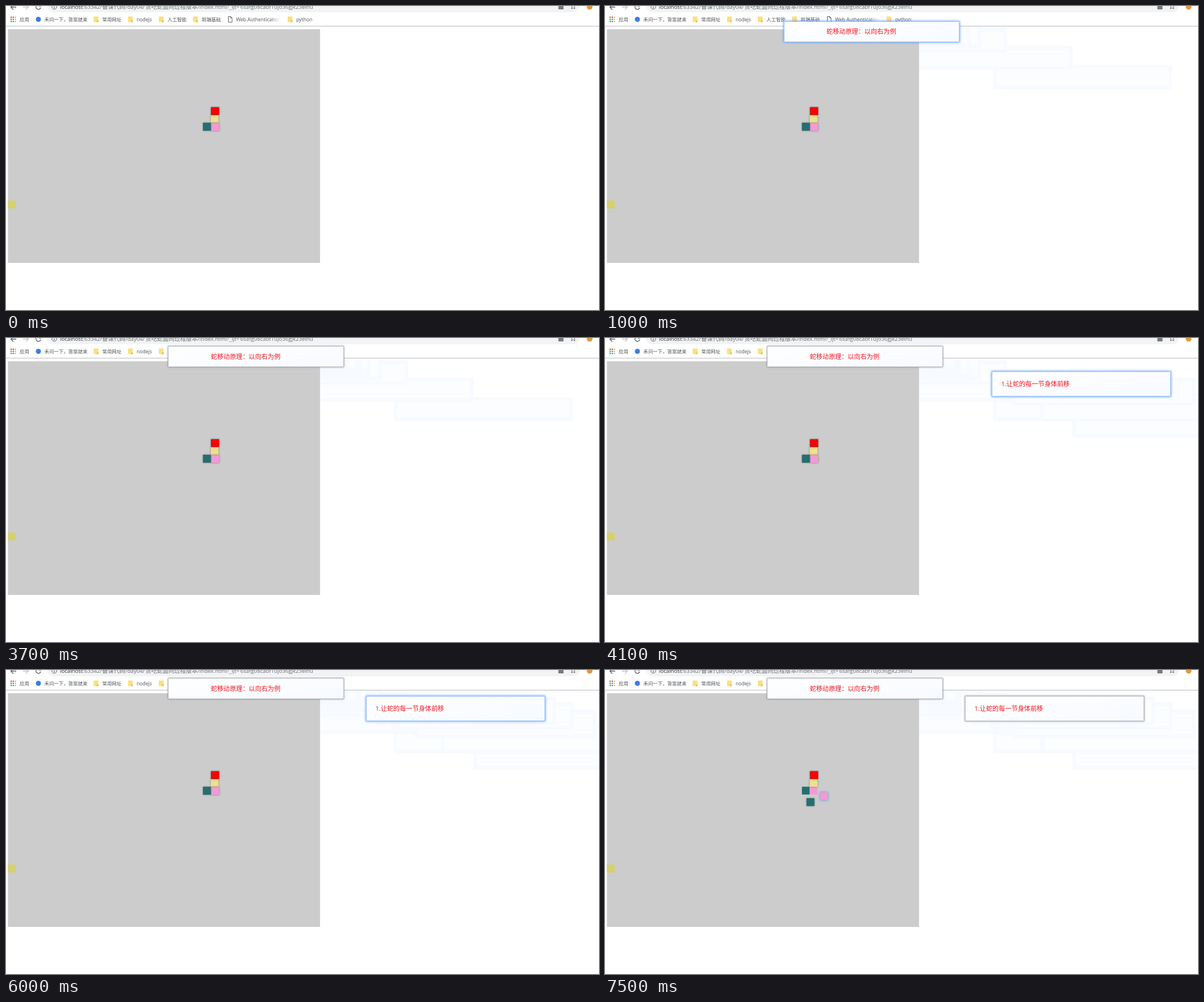
These frames come from a looping animation (1044x536 px, 8000 ms). An HTML page:

```html
<!DOCTYPE html>
<html lang="zh">
<head>
<meta charset="utf-8">
<title>蛇移动原理</title>
<style>
  html, body { margin: 0; width: 100%; height: 100%; overflow: hidden; background: #fff; }
  svg { display: block; width: 100%; height: 100%; }
  text { font-family: "Open Sans", "Noto Sans CJK SC", "Noto Sans CJK", sans-serif; white-space: pre; }
  .cjk { font-size: 8.45px; fill: #505357; }
  .latin { font-size: 8.6px; fill: #505357; }
  .note { font-size: 11.15px; fill: #f5141c; }
  .soft { filter: drop-shadow(0 0 1.5px #777); }
  .glow { filter: drop-shadow(0 0 2px #4794f5); }
  .panel { stroke: #c2c4c8; }
  .glow .panel { stroke: #8ebcf5; }
  .icon { fill: none; stroke: #5f6368; stroke-width: 1.3; }
</style>
</head>
<body>
<svg viewBox="0 0 1044 536" preserveAspectRatio="none">
  <defs>
    <linearGradient id="paper" x1="0" y1="0" x2="1" y2="1">
      <stop offset="0" stop-color="#fff"/><stop offset="1" stop-color="#f7faff"/>
    </linearGradient>
    <linearGradient id="fade">
      <stop offset="0" stop-color="#fff" stop-opacity="0"/><stop offset=".75" stop-color="#fff"/>
    </linearGradient>
    <clipPath id="blank"><rect x="553" y="36.5" width="491" height="300"/></clipPath>
  </defs>
  <rect width="1044" height="536" fill="#fff"/>

  <!-- address bar -->
  <rect x="72" y="-11" width="938" height="22" rx="11" fill="#f1f3f4"/>
  <g class="icon">
    <path d="M13-2L8.500 2L13 6.500M9 2H18"/>
    <path d="M35-2L39.500 2L35 6.500M39 2H30" stroke="#c3c5c8"/>
    <path d="M60.500-1A4.300 4.300 0 1 0 61.200 2.800M61.500-3V0H58"/>
    <circle cx="85" cy="1.500" r="4.200" stroke-width="1"/>
    <path d="M85 .8V4" stroke-width="1.200"/>
    <path d="M994.500-1.500L997-2L998.500-5L1000-2L1003-1.500L1000.700.7L1001.400 5L998.500 3.300L995.600 5L996.300.7Z" stroke-width="1"/>
  </g>
  <rect x="972.500" y="-3" width="9" height="9" fill="#777b80"/>
  <circle cx="1027.500" cy="1.500" r="5" fill="#e09a3e"/>
  <g id="url"></g>

  <!-- bookmarks -->
  <g id="apps"></g>
  <circle cx="57" cy="23.500" r="4.500" fill="#3c7be8"/>
  <g id="marks"></g>
  <path d="M391.500 18.500H395.500L398 21V28.500H391.500ZM395.500 18.500V21H398" fill="#fff" stroke="#5f6368" stroke-width="1"/>
  <rect x="466" y="16" width="24" height="16" fill="url(#fade)"/>
  <rect y="35" width="1044" height="1" fill="#b9bbbd"/>

  <!-- game board -->
  <rect x="3.400" y="41" width="549.500" height="412" fill="#ccc"/>
  <g id="trail" clip-path="url(#blank)"></g>
  <g id="cells"></g>

  <g id="title">
    <rect class="panel" x=".25" y=".25" width="308.500" height="36" fill="url(#paper)"/>
    <text class="note" x="75" y="22.300">蛇移动原理：以向右为例</text>
  </g>
  <g id="step">
    <rect class="panel" x=".25" y=".25" width="314.500" height="43.500" fill="url(#paper)"/>
    <text class="note" x="16.500" y="25.800">1.让蛇的每一节身体前移</text>
  </g>
</svg>
<script>
const LOOP = 8000, TICK = 100, CELL = 13.73;
const $ = id => document.getElementById(id);

function add(parent, tag, attrs, text) {
  const el = document.createElementNS("http://www.w3.org/2000/svg", tag);
  for (const key in attrs) el.setAttribute(key, attrs[key]);
  if (text) el.textContent = text;
  parent.appendChild(el);
  return el;
}

// address: text, x, size, colour
[
  ["localhost", 95, 9.65, "#33363a"],
  [":63342/", 135.5, 9.65],
  ["备课代码", 169.3, 10.2],
  ["/day04/", 210.2, 9.65],
  ["贪吃蛇面向过程版本", 245.5, 10.2],
  ["/index.html?", 337.3, 9.65],
  ["_ijt=", 393, 9.65],
  ["6safg08cabf1ujo36gjk23eihu", 412.5, 9.65]
].forEach(([s, x, size, fill = "#6b6f74"]) =>
  add($("url"), "text", { x, y: 5, "font-size": size, fill }, s));

const dots = ["#e2463b", "#e2463b", "#f0b429", "#35a853", "#4384f3", "#f0b429", "#35a853", "#4384f3", "#f0b429"];
dots.forEach((fill, i) => add($("apps"), "rect",
  { x: 8 + i % 3 * 3.7, y: 18.7 + Math.floor(i / 3) * 3.7, width: 2.3, height: 2.3, fill }));

// bookmark: text, x, has folder
[
  ["应用", 24], ["禾问一下，答案就来", 67.5], ["常用网址", 169.5, 1], ["nodejs", 230, 1],
  ["人工智能", 284.3, 1], ["前端基础", 344.5, 1], ["Web Authentication", 405], ["python", 511, 1]
].forEach(([s, x, folder]) => {
  const latin = /^[a-z]/i.test(s);
  add($("marks"), "text", { x, y: 27, class: latin ? "latin" : "cjk" }, s);
  if (!folder) return;
  const left = x - 15.2;
  add($("marks"), "rect", { x: left, y: 18.5, width: 8.5, height: 10, rx: .8, fill: "#fbdf83" });
  add($("marks"), "path", { d: `M${left + 5.5} 28.5V25.5H${left + 8.5}V28.5Z`, fill: "#edbf48" });
});

// board cells
function cell(x, y, fill, cls = "") {
  return add($("cells"), "rect", { x, y, width: 13.8, height: 13.8, fill, class: cls });
}
const gridX = n => 3.4 + n * CELL, gridY = n => 41 + n * CELL;
const TEAL = "#246f70", PINK = "#f29ad4";
cell(gridX(0), gridY(22), "#d5d26b");
cell(gridX(25), gridY(12), TEAL);
cell(gridX(26), gridY(12), PINK);
cell(gridX(26), gridY(11), "#eee08e", "soft");
cell(360.8, 178.4, "#c01010", "soft").setAttribute("width", 14.5);
add($("cells"), "rect", { x: 362, y: 179, width: 12.8, height: 11.5, fill: "#f00" });
const tail = cell(0, 0, TEAL), body = cell(0, 0, PINK);

// each run holds one position per tick from its start time
const runs = (...list) => list.flatMap(([start, ...pts]) =>
  pts.map(([x, y], i) => ({ at: start + i * TICK, x, y })));

const paths = {
  title: runs(
    [500, [686, 107], [511, 73], [396, 43], [350, 35], [330, 31], [315, 27], [312, 24], [310, 20], [309, 18]],
    [1600, [290, 11.5], [285.5, 14.5]]),
  step: runs([3800, [826, 129], [769, 100], [721, 73], [681, 59], [650, 50], [634, 46]]),
  tail: runs([0, [347, 206]], [6100, [348, 208], [353, 221], [354.8, 226]]),
  body: runs([0, [361.6, 206.4]], [7300, [367, 209], [375, 215], [378.6, 215.6]])
};

const sizes = { title: [309, 36.5], step: [315, 44] };
const ghosts = ["title", "step"].flatMap(name => paths[name].map(p => ({
  at: p.at,
  el: add($("trail"), "rect", {
    x: p.x, y: p.y, width: sizes[name][0], height: sizes[name][1],
    fill: "#fcfdff", stroke: "#f7faff", "stroke-width": 6, "stroke-linejoin": "round"
  })
})));

const shapes = [
  { el: $("title"), path: paths.title, glow: [500, 3700] },
  { el: $("step"), path: paths.step, glow: [3800, 6100] },
  { el: tail, path: paths.tail, glow: [6100, 6500] },
  { el: body, path: paths.body, glow: [7200, LOOP] }
];

function render(t) {
  for (const { el, path, glow } of shapes) {
    const p = path.filter(q => q.at <= t).pop();
    el.style.display = p ? "" : "none";
    if (p) el.setAttribute("transform", `translate(${p.x} ${p.y})`);
    el.setAttribute("class", t >= glow[0] && t < glow[1] ? "glow" : "soft");
  }
  for (const g of ghosts) g.el.style.display = g.at <= t ? "" : "none";
}

const begin = performance.now();
function loop() {
  render((performance.now() - begin) % LOOP);
  requestAnimationFrame(loop);
}
loop();
</script>
</body>
</html>
```
